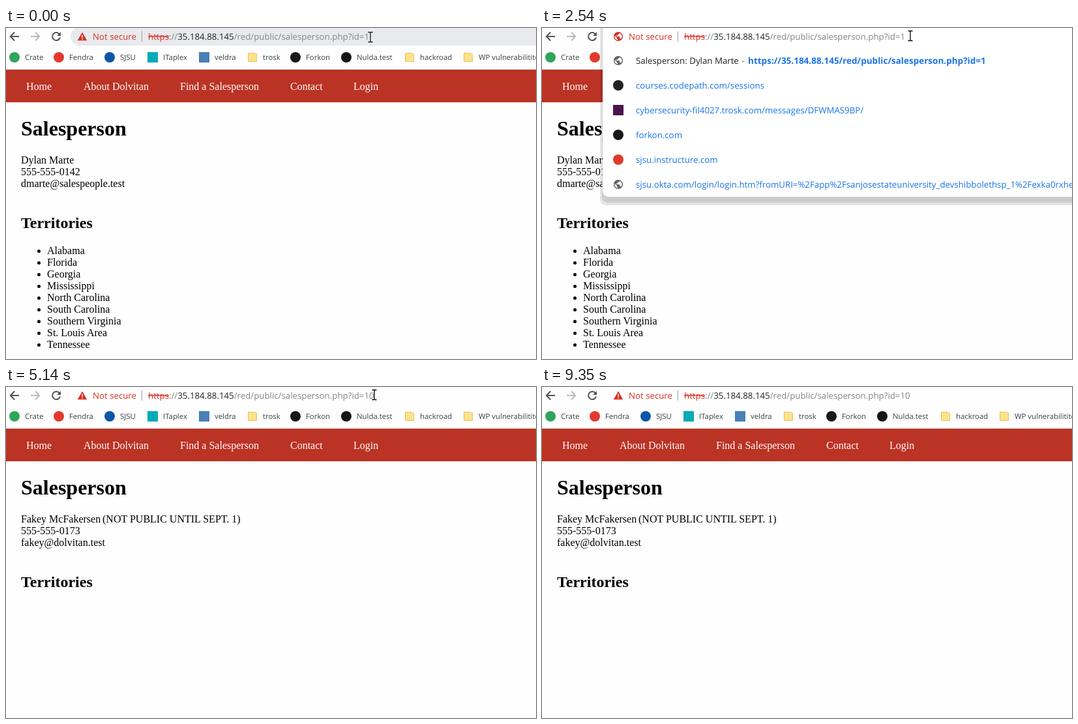
An HTML page for the animation above (9.76 s loop, 813 by 508 pixels).

```html
<!DOCTYPE html>
<html lang="en">
<head>
<meta charset="utf-8">
<title>Salesperson</title>
<style>
html, body { margin: 0; width: 100%; height: 100%; overflow: hidden; background: #fefefe; }
svg { display: block; width: 100vw; height: 100vh; }
text { white-space: pre; }
.ui { font: 13.28px "Open Sans", "Noto Sans", sans-serif; text-rendering: geometricPrecision; fill: #202124; }
.mark { font-size: 11.38px; fill: #3c4043; }
.page { font: 16px "Liberation Serif", serif; fill: #000; }
.nav { fill: #fff; }
.h1 { font-size: 32px; font-weight: bold; }
.h2 { font-size: 24px; font-weight: bold; }
.dim { fill: #80868b; }
.gray { fill: #5f6368; }
.red { fill: #d93025; }
.cut { text-decoration: line-through; }
.link { fill: #1a73e8; }
.bold { font-weight: bold; font-size: 13.52px; }
.inv, .inv * { fill: #fff; text-decoration: none; }
.line { fill: none; stroke: #505357; stroke-width: 2; }
.pale { stroke: #b9bcbf; }
#beam { fill: none; stroke: #fff; stroke-width: 1.3; mix-blend-mode: difference; }
</style>
</head>
<body>
<svg id="stage" viewBox="0 0 813 508" preserveAspectRatio="none">
  <defs>
    <path id="globe" transform="scale(.7) translate(-12 -12)" d="M12 2C6.48 2 2 6.48 2 12s4.48 10 10 10 10-4.48 10-10S17.52 2 12 2zm-1 17.93c-3.95-.49-7-3.85-7-7.93 0-.62.08-1.21.21-1.79L9 15v1c0 1.1.9 2 2 2v1.93zm6.9-2.54c-.26-.81-1-1.39-1.9-1.39h-1v-3c0-.55-.45-1-1-1H8v-2h2c.55 0 1-.45 1-1V7h2c1.1 0 2-.9 2-2v-.41c2.93 1.19 5 4.06 5 7.41 0 2.08-.8 3.97-2.1 5.39z"/>
    <path id="folder" d="M-6.5-6.5h9l4 1.5v11.5h-13z" fill="#fbe28c" stroke="#e5c45c"/>
  </defs>
  <rect width="813" height="508" fill="#fefefe"/>
  <rect id="pill" x="99" y="-1" width="760" height="28" rx="14" fill="#e8eaed"/>

  <g id="marks" class="ui"></g>

  <rect y="63" width="813" height="1" fill="#d9d9d9"/>
  <rect y="64" width="813" height="50" fill="#bb3324"/>
  <g id="nav" class="page nav"></g>
  <g class="page">
    <text x="23" y="165" class="h1">Salesperson</text>
    <text x="23" y="307" class="h2">Territories</text>
    <g id="before">
      <text x="23" y="208">Dylan Marte</text>
      <text x="23" y="226">555-555-0142</text>
      <text x="23" y="244">dmarte@salespeople.test</text>
    </g>
    <g id="after">
      <text x="23" y="208">Fakey McFakersen</text>
      <text id="note" x="148" y="208">(NOT PUBLIC UNTIL SEPT. 1)</text>
      <text x="23" y="226">555-555-0173</text>
      <text x="23" y="244">fakey@dolvitan.test</text>
    </g>
  </g>

  <g id="list1" class="ui"></g>
  <g id="list2" class="ui"></g>

  <path class="line" d="M20 13H7M13 6.5L6.8 13l6.2 6.5"/>
  <path class="line pale" d="M38 13h13M45 6.5L51.2 13 45 19.5"/>
  <g id="reload">
    <path class="line" d="M82 9.5A6 6 0 1 0 83 14.5"/>
    <path d="M84 6v6h-6z" fill="#505357"/>
  </g>
  <path id="stop" class="line" d="M71.5 7.5l11 11m0-11l-11 11"/>

  <g class="ui">
    <g id="warn">
      <path class="red" d="M117 6.5l7.3 12.7h-14.6z"/>
      <path d="M117 10.8v4M117 16v1.6" stroke="#fff" stroke-width="1.5"/>
    </g>
    <use id="badGlobe" href="#globe" class="red" transform="translate(117 13)"/>
    <use id="okGlobe" href="#globe" class="gray" transform="translate(117 13)"/>
    <g id="unsafe">
      <text x="133" y="18" class="red">Not secure</text>
      <path d="M208.5 5v16" stroke="#9aa0a6"/>
    </g>
    <text id="url1" x="218" y="18"></text>
    <text id="url10" x="218" y="18"></text>
    <text id="typed" x="144" y="18"></text>
  </g>
  <rect id="caret" y="3" width="1" height="18"/>
  <path id="beam" d="M-3.5-7.5h2.5q1 0 1 1v13q0 1-1 1h-2.5M3.5-7.5h-2.5q-1 0-1 1M3.5 7.5h-2.5q-1 0-1-1"/>
  <path id="arrow" fill="#fff" stroke="#000" d="M0 0v16l3.7-3.5 2.4 5.6 2.3-1-2.4-5.5h5z"/>
</svg>
<script>
const LOOP = 9760;
const NS = "http://www.w3.org/2000/svg";
const $ = id => document.getElementById(id);
const text = (x, y, s, cls = "") => `<text x="${x}" y="${y}" class="${cls}">${s}</text>`;
const dot = (x, y, c) => `<circle cx="${x}" cy="${y}" r="8" fill="${c}"/>`;
const box = (x, y, c) => `<rect x="${x - 8}" y="${y - 8}" width="16" height="16" fill="${c}"/>`;
const folder = (x, y) => `<use href="#folder" x="${x}" y="${y}"/>`;
const globe = (x, y) => `<use href="#globe" class="gray" transform="translate(${x} ${y})"/>`;

// Bookmarks bar
$("marks").innerHTML = [
  [dot, 13, "#2fa45a", 29, "Crate"],
  [dot, 81, "#e13a2d", 97, "Fendra"],
  [dot, 159, "#0b57a6", 175, "SJSU"],
  [box, 225, "#06aab8", 241, "ITaplex"],
  [box, 304, "#4a7fb8", 320, "veldra"],
  [folder, 378, "", 394, "trosk"],
  [dot, 444, "#191717", 460, "Forkon"],
  [dot, 522, "#161616", 538, "Nulda.test"],
  [folder, 619, "", 635, "hackroad"],
  [folder, 709, "", 725, "WP vulnerabilitites"]
].map(([icon, x, c, tx, s]) => icon(x, 45, c) + text(tx, 49, s, "mark")).join("");

// Site menu and list
$("nav").innerHTML = [[31, "Home"], [119, "About Dolvitan"], [267, "Find a Salesperson"], [436, "Contact"], [533, "Login"]]
  .map(([x, s]) => text(x, 95, s)).join("");
$("before").innerHTML += ["Alabama", "Florida", "Georgia", "Mississippi", "North Carolina", "South Carolina",
  "Southern Virginia", "St. Louis Area", "Tennessee"]
  .map((s, i) => `<circle cx="50.5" cy="${342.5 + i * 18}" r="2.5"/>` + text(63, 347 + i * 18, s)).join("");

// Address and suggestions
const host = "35.184.88.145";
const path = "/red/public/salesperson.php?id=";
const unsafeUrl = id => `<tspan class="red cut">https</tspan><tspan class="dim">://</tspan>${host}<tspan class="dim">${path}${id}</tspan>`;
$("url1").innerHTML = unsafeUrl(1);
$("url10").innerHTML = unsafeUrl(10);
$("typed").innerHTML = `<tspan class="dim">https://</tspan>${host}<tspan class="dim">${path}10</tspan>`;

const panel = h => [[89, h + 13, .1], [92, h + 9, .1], [93, h, 0]].map(([x, b, a]) =>
  `<rect x="${x}" y="-20" width="800" height="${b + 20}" rx="9" fill="${a ? `rgba(0,0,0,${a})` : "#fff"}"/>`).join("");
const fullUrl = id => `https://${host}${path}${id}`;

$("list1").innerHTML = panel(259) + globe(117, 50) +
  text(144, 55, "Salesperson: Dylan Marte") + text(306.5, 55, "-", "gray") + text(316, 55, fullUrl(1), "link bold") +
  [
    [dot, "#222", "courses.codepath.com/sessions"],
    [box, "#4a154b", "cybersecurity-fil4027.trosk.com/messages/DFWMAS9BP/"],
    [dot, "#191717", "forkon.com"],
    [dot, "#e13a2d", "sjsu.instructure.com"],
    [globe, "", "sjsu.okta.com/login/login.htm?fromURI=%2Fapp%2Fsanjosestateuniversity_devshibbolethsp_1%2Fexka0rxhe2q7"]
  ].map(([icon, c, s], i) => icon(117, 88 + i * 38, c) + text(144, 93 + i * 38, s, "link")).join("");

$("list2").innerHTML = panel(107) + globe(117, 50) +
  text(144, 55, "Salesperson: Fakey McFakersen") + text(341, 55, "(NOT PUBLIC UNTIL SEPT. 1)") +
  text(520, 55, "-", "gray") + text(529, 55, fullUrl(10), "link bold") +
  `<path fill="none" stroke="#5f6368" stroke-width="1.6" d="M119 90l4.5 4.5"/>
   <circle cx="116" cy="87" r="4" fill="none" stroke="#5f6368" stroke-width="1.6"/>` +
  text(144, 93, fullUrl(10)) + text(496, 93, "- Dorvan Search", "gray");

// Selection running from the end of a text back to a pointer position
function selection(el, top, height, color) {
  const id = el.id + "Clip";
  const g = document.createElementNS(NS, "g");
  g.innerHTML = `<clipPath id="${id}"><rect y="${top}" height="${height}"/></clipPath>
    <g clip-path="url(#${id})"><rect y="${top}" width="813" height="${height}" fill="${color}"/></g>`;
  const copy = el.cloneNode(true);
  copy.removeAttribute("id");
  copy.setAttribute("class", "inv");
  g.lastElementChild.append(copy);
  el.after(g);
  const clip = g.querySelector("rect");
  return (on, x) => {
    g.style.display = on ? "" : "none";
    if (!on) return;
    const n = el.getNumberOfChars();
    const end = el.getEndPositionOfChar(n - 1).x;
    let from = end;
    for (let i = n - 1; i >= 0; i--) {
      const a = el.getStartPositionOfChar(i).x;
      if ((a + el.getEndPositionOfChar(i).x) / 2 < x) break;
      from = a;
    }
    clip.setAttribute("x", Math.floor(from - .5));
    clip.setAttribute("width", Math.max(0, Math.round(end) - Math.floor(from - .5)));
  };
}
const selectId = selection($("url1"), 3, 21, "#0078d7");
const selectNote = selection($("note"), 194, 18, "#3390ff");

// Pointer legs: start, end, number of steps, target, easing power
const legs = [
  [120, 640, 5, 531, 13, 1],
  [1160, 1160, 1, 527, 12, 1],
  [1590, 1850, 3, 565, 12, 1],
  [5570, 6580, 8, 387, 210, 1.1],
  [6700, 7670, 8, 156, 208, 1.17],
  [7920, 8040, 2, 151, 206, 1],
  [8470, 9204, 6, 765, 476, 1.1]
];
function pointer(t) {
  let x = 559, y = 14;
  for (const [a, b, n, tx, ty, pow] of legs) {
    if (t < a) break;
    const k = n === 1 ? 1 : Math.min(n, Math.floor((t - a) / (b - a) * (n - 1) + 1.001));
    const p = (k / n) ** pow;
    x += (tx - x) * p;
    y += (ty - y) * p;
  }
  return [x, y];
}

const show = (id, on) => { $(id).style.display = on ? "" : "none"; };
const OPEN = 240, TYPE = 3090, ENTER = 4210, LOAD = 4770, DONE = 4890;

function draw(t) {
  const within = (a, b) => t >= a && t < b;
  show("pill", t < OPEN);
  show("list1", within(OPEN, TYPE));
  show("list2", within(TYPE, ENTER));
  show("before", t < LOAD);
  show("after", t >= LOAD);
  show("stop", within(ENTER, 5140));
  show("reload", !within(ENTER, 5140));
  show("warn", t < OPEN || t >= DONE);
  show("badGlobe", within(OPEN, TYPE));
  show("okGlobe", within(TYPE, DONE));
  show("unsafe", !within(TYPE, DONE));
  show("url1", t < TYPE);
  show("typed", within(TYPE, DONE));
  show("url10", t >= DONE);
  show("caret", within(1980, 2540) || within(TYPE, 3620));
  $("caret").setAttribute("x", t < TYPE ? 558 : 491);

  const [x, y] = pointer(t);
  selectId(within(OPEN, 1980), pointer(Math.min(t, 1500))[0]);
  selectNote(within(6700, 8470), x + (t < 7900 ? 4 : -3));

  const isBeam = y < 27 || (y > 194 && y < 216);
  show("beam", isBeam && t < 9350);
  show("arrow", !isBeam && t < 9350);
  $(isBeam ? "beam" : "arrow").setAttribute("transform", `translate(${Math.round(x)} ${Math.round(y)})`);
}

const start = performance.now();
function tick() {
  draw((performance.now() - start) % LOOP);
  requestAnimationFrame(tick);
}
tick();
</script>
</body>
</html>
```
